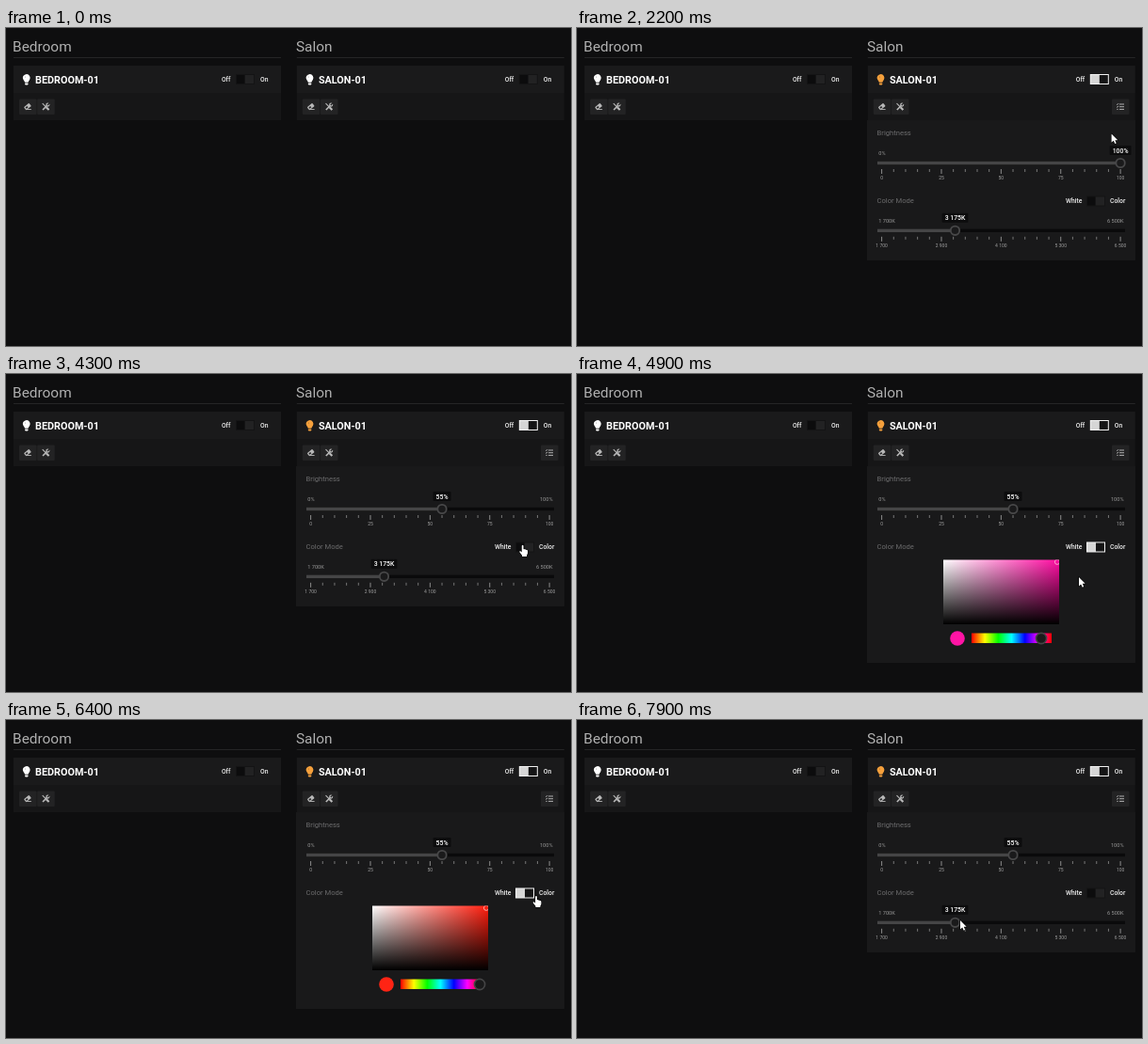
An HTML page with a canvas for the animation above (8 s loop, 600 by 338 pixels).

```html
<!DOCTYPE html>
<html lang="en">
<head>
<meta charset="utf-8">
<title>Light controls</title>
<style>
html, body { margin: 0; width: 100%; height: 100%; overflow: hidden; background: #0e0e0f; }
canvas { display: block; width: 600px; height: 338px; }
</style>
</head>
<body>
<canvas id="stage" width="600" height="338"></canvas>
<script>
const ctx = document.getElementById('stage').getContext('2d');
const LOOP = 8000;
const SWITCH_ON = 1500, COLOR_ON = 4650, COLOR_OFF = 6900;

// Keys are [time, value, value...]; motion eases between them.
const POINTER = [
  [500, 573, 226], [1150, 550, 53.5], [1900, 550, 53.5], [2400, 577, 144],
  [2550, 577, 144], [3300, 480.3, 144], [3700, 463, 144], [3850, 463, 144],
  [4350, 551, 183], [4700, 551, 183], [4900, 533, 216], [5250, 493, 279],
  [5350, 493, 279], [5600, 499, 279], [5900, 503, 280], [6050, 503, 280],
  [6400, 563, 187], [6650, 552, 183], [7200, 552, 183], [7750, 407, 213]
];
const BRIGHT = [[2550, 100], [3300, 62], [3700, 55]];
const HUE = [[5350, 323], [5600, 345], [5900, 364]];

function at(keys, t) {
  if (t <= keys[0][0]) return keys[0].slice(1);
  for (let i = 1; i < keys.length; i++) {
    const a = keys[i - 1], b = keys[i];
    if (t < b[0]) {
      const u = (t - a[0]) / (b[0] - a[0]);
      const e = u * u * (3 - 2 * u);
      return a.slice(1).map((v, k) => v + (b[k + 1] - v) * e);
    }
  }
  return keys[keys.length - 1].slice(1);
}

function box(x, y, w, h, color) {
  ctx.fillStyle = color;
  ctx.fillRect(x, y, w, h);
}

function round(x, y, w, h, r, color) {
  ctx.fillStyle = color;
  ctx.beginPath();
  ctx.roundRect(x, y, w, h, r);
  ctx.fill();
}

function disc(x, y, r, fill, stroke, width) {
  ctx.beginPath();
  ctx.arc(x, y, r, 0, Math.PI * 2);
  if (fill) { ctx.fillStyle = fill; ctx.fill(); }
  if (stroke) { ctx.strokeStyle = stroke; ctx.lineWidth = width; ctx.stroke(); }
}

function line(points, color, width) {
  ctx.strokeStyle = color;
  ctx.lineWidth = width;
  ctx.beginPath();
  points.forEach(([x, y], i) => i ? ctx.lineTo(x, y) : ctx.moveTo(x, y));
  ctx.stroke();
}

function text(str, x, y, size, color, weight = 400, align = 'left') {
  ctx.font = `${weight} ${size}px Roboto, sans-serif`;
  ctx.textAlign = align;
  ctx.fillStyle = color;
  ctx.fillText(str, x, y);
}

function bulb(x, y, color) {
  ctx.fillStyle = color;
  ctx.beginPath();
  ctx.arc(x, y - 2, 3.8, Math.PI * 0.83, Math.PI * 0.17);
  ctx.quadraticCurveTo(x + 2, y + 1.6, x + 1.8, y + 2.8);
  ctx.lineTo(x - 1.8, y + 2.8);
  ctx.quadraticCurveTo(x - 2, y + 1.6, x - 3.3, y);
  ctx.fill();
  round(x - 1.8, y + 3.4, 3.6, 2, 0.8, color);
  disc(x - 1.3, y - 3, 0.6, 'rgba(0,0,0,.35)');
}

function toggle(x, y, on) {
  if (on) {
    box(x, y, 20, 11, '#f2f2f2');
    box(x + 1, y + 1, 9, 9, '#d6d6d6');
    box(x + 10, y + 1, 9, 9, '#141415');
  } else {
    box(x, y, 20, 11, '#141415');
    box(x + 1, y + 1, 8, 9, '#0c0c0d');
    box(x + 10, y + 1, 9, 9, '#222223');
  }
}

function eraser(x, y) {
  ctx.save();
  ctx.translate(x, y - 0.3);
  ctx.rotate(-0.7);
  round(-3.8, -1.9, 7.2, 4, 0.9, '#b8b8b8');
  box(-2.5, -0.8, 2.3, 1.8, '#232324');
  ctx.restore();
  box(x - 1.3, y + 2.4, 5.1, 0.9, '#b8b8b8');
}

function tools(x, y) {
  const c = '#bcbcbc';
  line([[x - 3.2, y + 3.3], [x + 1.8, y - 1.7]], c, 1.6);
  disc(x + 2.2, y - 2.1, 1.5, null, c, 1.1);
  line([[x + 2.3, y - 2.2], [x + 4.3, y - 4.2]], '#232324', 1.2);
  line([[x - 3.5, y - 3.5], [x + 0.5, y + 0.4]], c, 1.1);
  line([[x + 0.5, y + 0.5], [x + 3.4, y + 3.4]], c, 2.1);
}

function listIcon(x, y) {
  for (let i = -1; i < 2; i++) {
    const row = y + i * 2.7;
    box(x - 1, row - 0.5, 5, 1, '#b0b0b0');
    if (i < 1) line([[x - 4, row - 0.1], [x - 3.2, row + 0.6], [x - 1.9, row - 0.9]], '#b0b0b0', 0.9);
    else disc(x - 3, row, 0.7, '#b0b0b0');
  }
}

function button(x, icon) {
  round(x, 75.5, 18.5, 16.5, 1, '#232324');
  icon(x + 9, 83.7);
}

function card(x, title, name, on) {
  text(title, x - 0.9, 25, 15.4, '#b0b0b0');
  box(x, 31, 284, 1, '#252526');
  box(x, 40, 284, 29, '#1a1a1b');
  box(x, 69, 284, 29, '#161617');
  bulb(x + 13.8, 55, on ? '#f5a03c' : '#fff');
  text(name, x + 23.1, 58.6, 10.8, '#fff', 700);
  text('Off', x + 220.9, 57.4, 6.8, '#f0f0f0', 500);
  toggle(x + 236, 49, on);
  text('On', x + 262, 57.4, 6.8, '#f0f0f0', 500);
  button(x + 6, eraser);
  button(x + 25.2, tools);
}

function slider(y, part, active, label, ends, marks) {
  const left = 323.6, span = 253.5;
  const x = left + span * part;
  text(ends[0], 320.3, y - 8.6, 5.6, '#9a9a9a');
  text(ends[1], 580.5, y - 8.6, 5.6, '#9a9a9a', 400, 'right');
  box(319, y - 1.7, 263, 3.4, '#0a0a0b');
  box(319, y - 1.7, x - 319, 3.4, '#454546');
  disc(x, y, 4.7, '#1a1a1b', active ? '#fff' : '#484849', 1.8);

  ctx.font = '500 6.9px Roboto, sans-serif';
  const w = ctx.measureText(label).width + 6;
  round(x - w / 2, y - 18.5, w, 10, 1, '#0c0c0d');
  text(label, x, y - 11, 6.9, '#fff', 500, 'center');

  for (let i = 0; i <= 20; i++) {
    const major = i % 5 === 0;
    box(left - 0.5 + i * span / 20, y + 6.5, 1, major ? 5 : 3, major ? '#8c8c8c' : '#777');
  }
  marks.forEach((m, i) => text(m, left + i * span / 4, y + 17.3, 5, '#a0a0a0', 400, 'center'));
}

function mix(color, amount) {
  return Math.round(255 * (1 - amount) + color * amount);
}

function hueRgb(h, sat) {
  const channel = n => {
    const k = (n + h / 60) % 6;
    return mix(255 * (1 - Math.max(0, Math.min(k, 4 - k, 1))), sat);
  };
  return `rgb(${channel(5)},${channel(3)},${channel(1)})`;
}

function gradient(x, y, w, h, x2, y2, stops) {
  const g = ctx.createLinearGradient(x, y, x2, y2);
  stops.forEach((c, i) => g.addColorStop(i / (stops.length - 1), c));
  box(x, y, w, h, g);
}

function picker(h) {
  gradient(389, 197.5, 123, 68.5, 512, 197.5, ['#fff', hueRgb(h, 0.95)]);
  gradient(389, 197.5, 123, 68.5, 389, 266, ['rgba(0,0,0,0)', '#000']);
  ctx.save();
  ctx.beginPath();
  ctx.rect(389, 197.5, 123, 68.5);
  ctx.clip();
  disc(510, 199.8, 2.6, null, 'rgba(255,225,225,.75)', 0.9);
  ctx.restore();

  disc(404, 281, 7.8, hueRgb(h, 0.92));
  const spectrum = [0, 60, 120, 180, 240, 300, 360].map(v => hueRgb(v, 1));
  gradient(419, 275.5, 85, 10.5, 504, 275.5, spectrum);
  disc(493 + (h - 323) / 4.1, 281, 5.6, '#1a1a1b', '#454546', 1.6);
}

function panel(t) {
  const color = t >= COLOR_ON && t < COLOR_OFF;
  box(308, 98, 285, color ? 209 : 149, '#19191a');
  button(568, listIcon);
  text('Brightness', 318.6, 114.3, 7.6, '#6c6c6d');
  const level = at(BRIGHT, t)[0];
  slider(143.5, level / 100, t > 2350 && t < 3900, Math.round(level) + '%',
    ['0%', '100%'], ['0', '25', '50', '75', '100']);

  text('Color Mode', 318.6, 186.4, 7.6, '#6c6c6d');
  text('White', 519, 186.4, 6.8, '#f0f0f0', 500);
  toggle(541, 178.5, color);
  text('Color', 566, 186.4, 6.8, '#f0f0f0', 500);
  if (color) picker(at(HUE, t)[0]);
  else slider(215.3, 1475 / 4800, false, '3 175K',
    ['1 700K', '6 500K'], ['1 700', '2 900', '4 100', '5 300', '6 500']);
}

function outlined(path) {
  ctx.lineJoin = 'round';
  ctx.strokeStyle = '#000';
  ctx.lineWidth = 1.2;
  ctx.stroke(path);
  ctx.fillStyle = '#fff';
  ctx.fill(path);
}

const ARROW = new Path2D('M0 0V9.4L2.2 7.4L3.7 10.7L5.2 10L3.8 6.8H6.7Z');
const HAND = new Path2D('M-.9 .5Q0 -.7 .9 .5V4.2Q1.8 3.5 2.4 4.6Q3.3 4 3.9 5.1Q5 4.6 5.4 5.9V8.4Q5.2 10 4.4 10.6V12H-.6V10.8L-3.3 7.4Q-3.7 5.9 -2.2 6.4L-.9 7.5Z');

function pointer(t) {
  if (t < POINTER[0][0]) return;
  const [x, y] = at(POINTER, t);
  const overPower = x > 528 && x < 580 && y > 46 && y < 63;
  const overMode = t > SWITCH_ON && x > 517 && x < 583 && y > 175 && y < 192;
  ctx.save();
  ctx.translate(x, y);
  outlined(overPower || overMode ? HAND : ARROW);
  ctx.restore();
}

function draw(t) {
  box(0, 0, 600, 338, '#0e0e0f');
  const on = t >= SWITCH_ON;
  card(8, 'Bedroom', 'BEDROOM-01', false);
  card(308.8, 'Salon', 'SALON-01', on);
  if (on) panel(t);
  pointer(t);
}

const start = performance.now();
function tick() {
  draw((performance.now() - start) % LOOP);
  requestAnimationFrame(tick);
}
tick();
</script>
</body>
</html>
```
